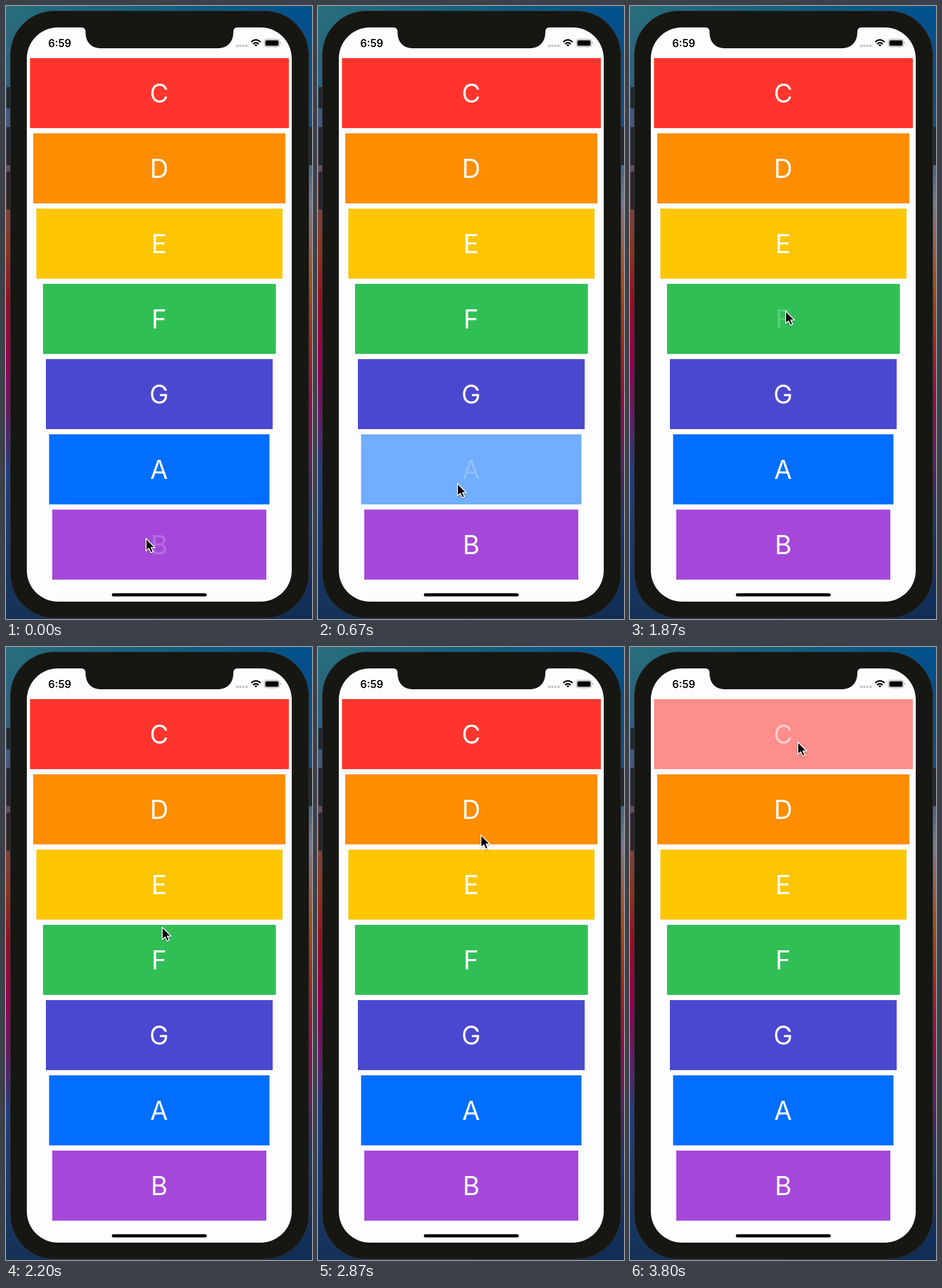
Animation, 529 px wide and 1059 px high, one loop 3870 ms. Source, as an HTML page:

```html
<!DOCTYPE html>
<html lang="en">
<head>
<meta charset="utf-8">
<title>Xylophone</title>
<style>
  html, body { margin: 0; width: 100%; height: 100%; overflow: hidden; background: #123055; }
  svg { display: block; width: 100vw; height: 100vh; }
  text { font-family: Inter, Roboto, sans-serif; }
  .note { fill: #fff; font-size: 44.5px; text-anchor: middle; }
  .clock { fill: #000; font-size: 18px; font-weight: 600; }
</style>
</head>
<body>
<svg viewBox="0 0 529 1059">
  <defs>
    <linearGradient id="left" x2="0" y2="1">
      <stop offset="0" stop-color="#286d7b"/>
      <stop offset=".13" stop-color="#2d6080"/>
      <stop offset=".22" stop-color="#55557c"/>
      <stop offset=".31" stop-color="#7c4644"/>
      <stop offset=".4" stop-color="#8c3420"/>
      <stop offset=".48" stop-color="#970e25"/>
      <stop offset=".58" stop-color="#990050"/>
      <stop offset=".67" stop-color="#641c68"/>
      <stop offset=".76" stop-color="#224080"/>
      <stop offset="1" stop-color="#143257"/>
    </linearGradient>
    <linearGradient id="right" x2="0" y2="1">
      <stop offset="0" stop-color="#00508c"/>
      <stop offset=".2" stop-color="#174c80"/>
      <stop offset=".32" stop-color="#79798f"/>
      <stop offset=".39" stop-color="#9c6048"/>
      <stop offset=".46" stop-color="#ab4912"/>
      <stop offset=".56" stop-color="#a52220"/>
      <stop offset=".65" stop-color="#980848"/>
      <stop offset=".74" stop-color="#5e1f62"/>
      <stop offset=".84" stop-color="#1c3468"/>
      <stop offset="1" stop-color="#102d57"/>
    </linearGradient>
    <linearGradient id="top">
      <stop offset="0" stop-color="#286d7b"/>
      <stop offset=".5" stop-color="#10627f"/>
      <stop offset="1" stop-color="#00508c"/>
    </linearGradient>
    <filter id="shadow" x="-50%" y="-50%" width="200%" height="200%">
      <feDropShadow dx="0" dy="1.5" stdDeviation="1.2" flood-opacity=".35"/>
    </filter>
  </defs>

  <rect width="265" height="1059" fill="url(#left)"/>
  <rect x="264" width="265" height="1059" fill="url(#right)"/>
  <rect width="529" height="20" fill="url(#top)"/>

  <g fill="#25262b">
    <rect x="1" y="140" width="9" height="37" rx="2"/>
    <rect x="1" y="209" width="9" height="66" rx="2"/>
    <rect x="1" y="286" width="9" height="66" rx="2"/>
    <rect x="520" y="209" width="9" height="66" rx="2"/>
  </g>
  <rect x="7.5" y="8.5" width="516" height="1049" rx="76" fill="#161713" stroke="#34363a"/>
  <rect x="36" y="37" width="458" height="992" rx="54" fill="#fdfdff"/>
  <path d="M130 36.5V37Q137.5 37 137.5 45C137.5 63 148 73 165 73H365C382 73 393 63 393 45Q393 37 400.500 37V36.500Z" fill="#161713"/>

  <text class="clock" x="73" y="70.500">6:59</text>
  <g fill="#c6c6c9">
    <circle cx="399.700" cy="68.700" r="2.200"/>
    <circle cx="405.100" cy="68.700" r="2.200"/>
    <circle cx="410.500" cy="68.700" r="2.200"/>
    <circle cx="415.900" cy="68.700" r="2.200"/>
  </g>
  <g fill="none" stroke="#000" stroke-width="2.500">
    <path d="M424 62.200Q432 54.800 440 62.200"/>
    <path d="M427 65.600Q432 61.200 437 65.600"/>
    <path d="M429.400 67.200Q432 65.200 434.600 67.200L432 70Z" fill="#000" stroke="none"/>
  </g>
  <rect x="446.500" y="57.500" width="26.500" height="13" rx="3.800" fill="none" stroke="#9b9b9e"/>
  <rect x="448.300" y="59.300" width="22.900" height="9.400" rx="2.300"/>
  <path d="M474.300 62Q476.500 64 474.300 66Z" fill="#9b9b9e"/>

  <g id="bars"></g>
  <rect x="183" y="1014.500" width="164" height="5.500" rx="2.750"/>
  <path id="cursor" d="M0 0V21.500L5 17L8.500 24.500L12.300 22.800L9 15.500H15.500Z"
    stroke="#fff" stroke-width="1.600" stroke-linejoin="round" filter="url(#shadow)"/>
</svg>

<script>
  const LOOP = 3870;
  const HOLD = 120;

  // top to bottom: name, left, right, colour, release time, pointer x, pointer y
  const keys = [
    ['C', 41.5, 489, '#ff352d', 3690, 290, 164],
    ['D', 47, 483, '#ff8d00', 3090, 284, 299],
    ['E', 52.5, 478, '#fdc600', 2490, 271, 441],
    ['F', 64, 466.5, '#30bf55', 1930, 269, 527],
    ['G', 69, 461, '#4b48d0', 1325, 252, 700],
    ['A', 74.5, 455.5, '#006eff', 660, 241, 825],
    ['B', 80, 450, '#a548da', 60, 242, 920]
  ].map(([name, left, right, color, release, x, y], row) =>
    ({ name, left, right, color, release, x, y, top: 90 + 130 * row }));

  const add = (parent, tag, attrs) => {
    const el = document.createElementNS('http://www.w3.org/2000/svg', tag);
    for (const name in attrs) el.setAttribute(name, attrs[name]);
    return parent.appendChild(el);
  };

  const bars = document.getElementById('bars');
  const cursor = document.getElementById('cursor');
  for (const key of keys) {
    key.bar = add(bars, 'g', {});
    add(key.bar, 'rect', {
      x: key.left, y: key.top, width: key.right - key.left, height: 121, fill: key.color
    });
    key.label = add(key.bar, 'text', { class: 'note', x: 264.7, y: key.top + 77 });
    key.label.textContent = key.name;
  }

  const clamp = v => Math.min(1, Math.max(0, v));
  const smooth = v => v * v * (3 - 2 * v);
  const stops = [...keys].reverse();

  function pointer(t) {
    let { x, y } = stops[0];
    for (let i = 1; i < stops.length; i++) {
      const from = stops[i - 1], to = stops[i];
      const start = from.release + 100;
      const end = to.release - HOLD;
      const p = smooth(clamp((t - start) / (end - start)));
      x += (to.x - from.x) * p;
      y += (to.y - from.y) * p;
    }
    return [x, y];
  }

  function draw(now) {
    // the screen refreshes 15 times a second
    const t = Math.floor((now % LOOP) * 0.015 + 0.1) / 0.015;
    for (const { bar, label, release } of keys) {
      const since = t - release;
      bar.setAttribute('opacity', since >= 0 && since < 200 ? 0.55 : 1);
      label.setAttribute('opacity', since < -HOLD ? 1 : 0.2 + 0.8 * clamp(since / 230));
    }
    cursor.setAttribute('transform', `translate(${pointer(t)})`);
  }

  const begin = performance.now();
  const tick = () => {
    draw(performance.now() - begin);
    requestAnimationFrame(tick);
  };
  tick();
</script>
</body>
</html>
```
